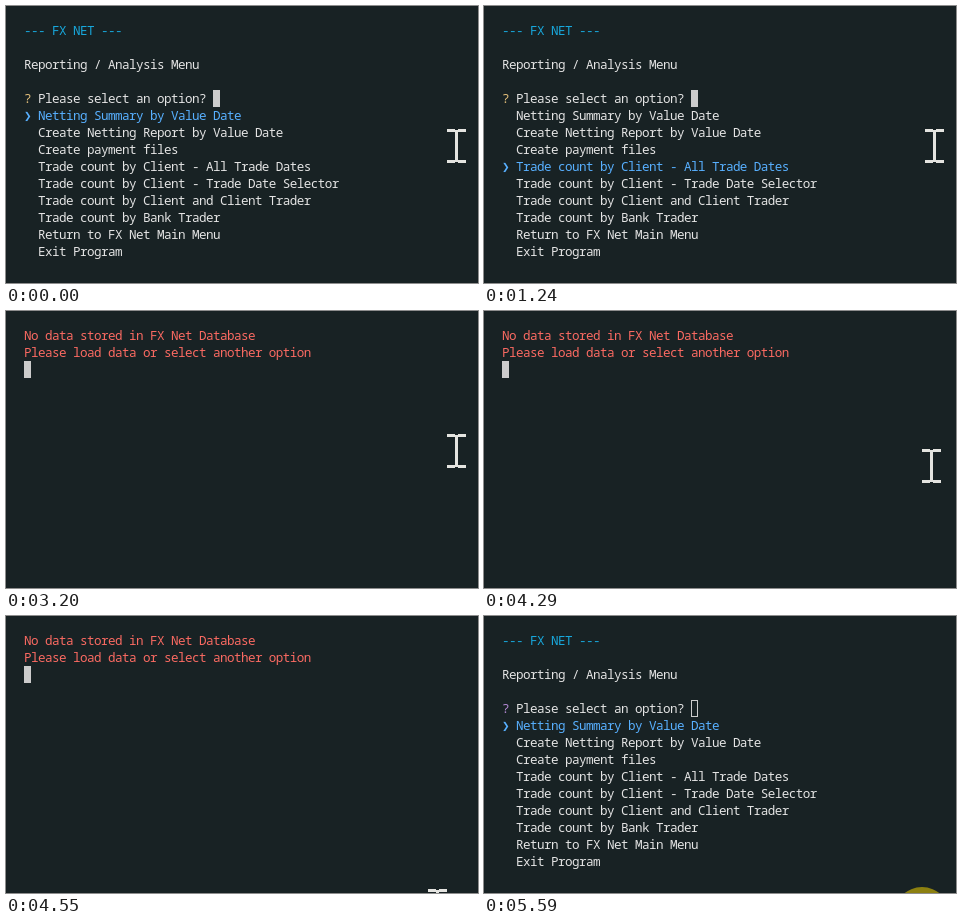
An HTML page that plays this animation: 472 by 277 pixels, repeating every 5.68 s.

```html
<!DOCTYPE html>
<html lang="en">
<head>
<meta charset="utf-8">
<title>Terminal menu</title>
<style>
  html, body { margin: 0; width: 100%; height: 100%; overflow: hidden; background: #182224; }
  #stage { position: relative; width: 472px; height: 277px; overflow: hidden; }
  #screen {
    position: absolute; left: 18px; top: 16px; margin: 0; white-space: pre; color: #e4e4e4;
    font: 12.6px/17px "Noto Sans Mono", "DejaVu Sans Mono", monospace;
    letter-spacing: -.56px; font-variant-ligatures: none;
  }
  .title { color: #18a8dc; }
  .error { color: #fa6a62; }
  .pick { color: #58b0ff; }
  .ask { color: #e5c07b; }
  .ask-again { color: #b58ad6; }
  .pointer { position: absolute; left: 0; font-family: "DejaVu Sans Mono", monospace; }
  #caret { position: absolute; width: 7px; height: 17px; box-sizing: border-box; border: 1px solid #ccc; }
  svg { position: absolute; left: 0; top: 0; }
</style>
</head>
<body>
<div id="stage">
  <pre id="screen"></pre>
  <div id="caret"></div>
  <svg width="472" height="277">
    <path id="beam" fill="#e4e4e0" d="M0 0h8v1h3v-1h8v3h-8v28h8v3h-8v-1h-3v1h-8v-3h8v-28h-8z"/>
    <circle id="click" cx="438" r="28" fill="#8c8010"/>
  </svg>
</div>
<script>
const LOOP = 5680, COL = 7, ROW = 17;
const $ = id => document.getElementById(id);
const screen = $('screen'), caret = $('caret'), beam = $('beam'), click = $('click');

const options = [
  'Netting Summary by Value Date',
  'Create Netting Report by Value Date',
  'Create payment files',
  'Trade count by Client - All Trade Dates',
  'Trade count by Client - Trade Date Selector',
  'Trade count by Client and Client Trader',
  'Trade count by Bank Trader',
  'Return to FX Net Main Menu',
  'Exit Program'
];
const span = (name, text) => `<span class="${name}">${text}</span>`;
const header = span('title', '--- FX NET ---') + '\n\nReporting / Analysis Menu\n\n';
const error = span('error', 'No data stored in FX Net Database\nPlease load data or select another option');

function menu(selected, askClass = 'ask') {
  const rows = options.map((text, i) => i === selected
    ? span('pick', span('pointer', '❯') + '  ' + text)
    : '  ' + text);
  return header + span(askClass, '?') + ' Please select an option?\n' + rows.join('\n');
}

// start time, content, caret column, caret row
const scenes = [
  [0, menu(0), 27, 4],
  [690, menu(1), 27, 4],
  [960, menu(2), 27, 4],
  [1240, menu(3), 27, 4],
  [1780, '', 0, 0],
  [3200, error, 0, 2],
  [5100, header, 0, 4],
  [5140, menu(0, 'ask-again'), 27, 4]
];
let shown;

function draw(t) {
  const scene = scenes.findLast(s => t >= s[0]);
  if (scene !== shown) {
    shown = scene;
    screen.innerHTML = scene[1];
    caret.style.left = 18 + scene[2] * COL + 'px';
    caret.style.top = 16 + scene[3] * ROW + 'px';
  }
  caret.style.background = t < 5590 ? '#ccc' : 'none';

  // The mouse slides off the bottom edge in 20 ms steps.
  const step = Math.max(0, Math.min(16, Math.floor((t - 4290) / 20) + 1));
  const left = 1 - step / 16;
  const x = 441 - Math.round(19 * (1 - left ** 2.31));
  const y = 123 + Math.round(155 * (1 - left ** 1.63));
  beam.setAttribute('transform', `translate(${x} ${y})`);

  click.setAttribute('cy', t < 5590 ? 302 : 299);
  click.setAttribute('visibility', t < 5570 ? 'hidden' : 'visible');
}

const start = performance.now();
function frame() {
  draw((performance.now() - start) % LOOP);
  requestAnimationFrame(frame);
}
frame();
</script>
</body>
</html>
```
